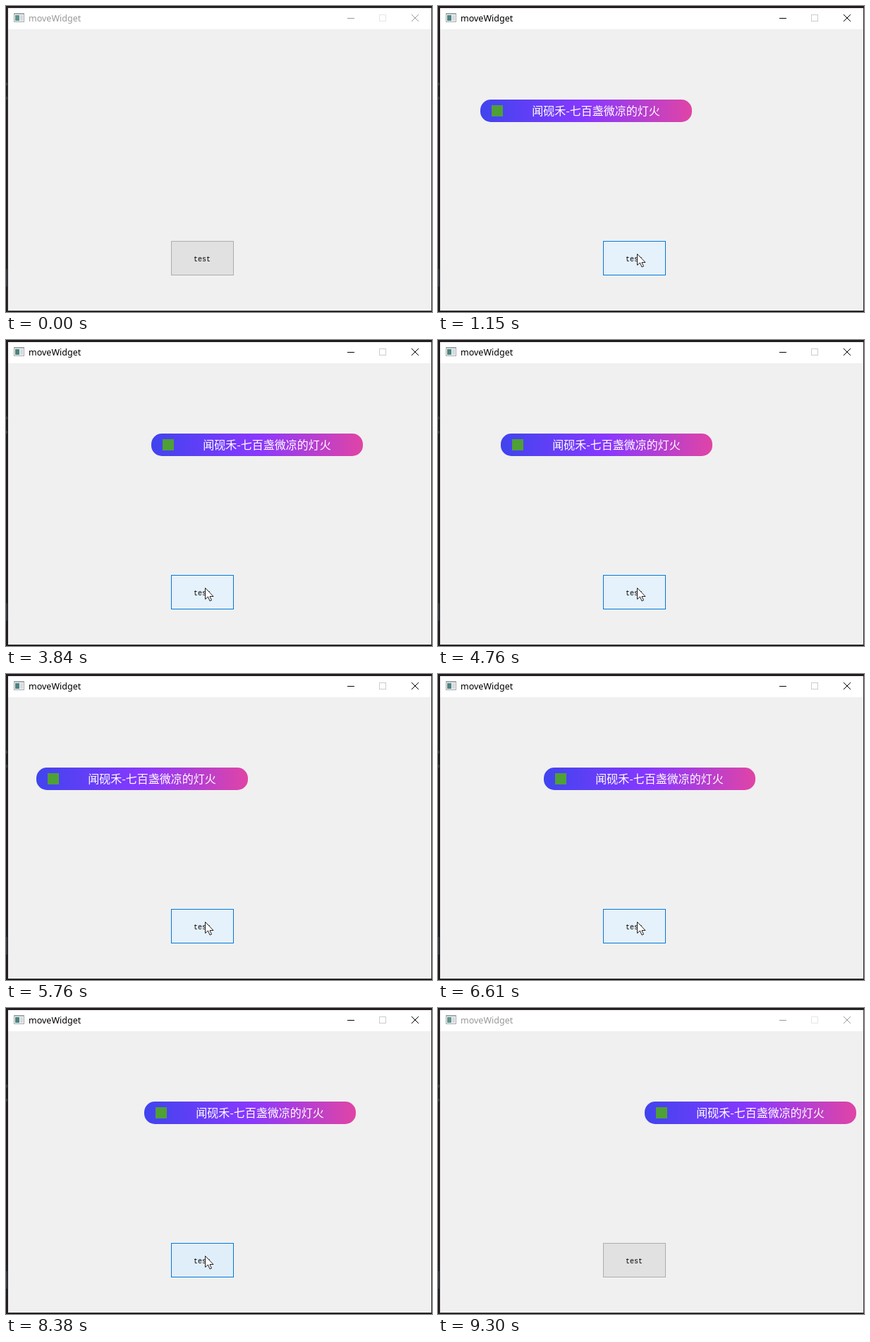
Animation of 604x435 px, one loop 9380 ms. Source, as an HTML page with a canvas:

```html
<!DOCTYPE html>
<html lang="zh">
<head>
<meta charset="utf-8">
<style>
  html, body { margin: 0; width: 604px; height: 435px; overflow: hidden; background: #1e1a1d; }
  canvas { display: block; }
</style>
</head>
<body>
<canvas id="stage" width="604" height="435"></canvas>
<script>
const ctx = document.getElementById('stage').getContext('2d');
const LOOP = 9380, STEP = 76.85;      // loop length and redraw interval, ms
const SPEED = 0.1265, TRAVEL = 300;   // pill speed in px/ms and its range
const CLICKS = [702, 6849];
const PRESS = 80;
const ACTIVE = [CLICKS[0] - PRESS, 9130];
const ENTER = [290, 560], LEAVE = [8790, 9050];

const clamp = v => Math.max(0, Math.min(1, v));
const ease = v => v * v * (3 - 2 * v);
const progress = (t, [from, to]) => ease(clamp((t - from) / (to - from)));

function rect(x, y, w, h, color) {
  ctx.fillStyle = color;
  ctx.fillRect(x, y, w, h);
}

function frame(x, y, w, h, color) {
  ctx.strokeStyle = color;
  ctx.lineWidth = 1;
  ctx.strokeRect(x + 0.5, y + 0.5, w - 1, h - 1);
}

function text(str, x, y, font, color, align = 'left') {
  ctx.font = font;
  ctx.fillStyle = color;
  ctx.textAlign = align;
  ctx.fillText(str, x, y);
}

function drawWindow(active) {
  rect(0, 0, 604, 435, '#1e1a1d');
  rect(0, 109, 2, 4, '#3a383c');
  rect(0, 129, 2, 4, '#3a383c');
  rect(0, 374, 2, 25, '#35323c');
  frame(2, 2, 602, 432, active ? '#2a272a' : '#3e3c3e');
  rect(3, 3, 600, 30, '#fff');
  rect(3, 33, 600, 400, '#f0f0f0');

  // application icon
  rect(11, 10, 15, 13, '#a3a9ae');
  rect(12, 12, 13, 10, '#f4f6f7');
  rect(13, 13, 6, 8, active ? '#4d8580' : '#5f958f');
  rect(20, 13, 4, 8, '#d5dadd');

  const ink = active ? '#000' : '#999';
  text('moveWidget', 32, 22, '12.5px "Noto Sans", sans-serif', ink);
  rect(484, 17, 10, 1, ink);
  frame(529, 12, 10, 10, active ? '#ccc' : '#e6e6e6');
  ctx.strokeStyle = ink;
  ctx.beginPath();
  ctx.moveTo(575, 12); ctx.lineTo(585, 22);
  ctx.moveTo(585, 12); ctx.lineTo(575, 22);
  ctx.stroke();
}

function drawButton(t, active, cursor) {
  const pressed = CLICKS.some(c => t >= c - PRESS && t < c);
  const hover = cursor && cursor.y < 383;
  let fill = '#e1e1e1', border = '#adadad';
  if (pressed) [fill, border] = ['#cce4f7', '#005499'];
  else if (hover) [fill, border] = [t < CLICKS[1] ? '#e5f1fb' : '#e0eefa', '#0078d7'];
  else if (active) border = '#0078d7';
  rect(234, 334, 89, 49, fill);
  frame(234, 334, 89, 49, border);
  text('test', 266, 363, '10px "Liberation Mono", monospace', '#000');
}

function drawPill(t) {
  const start = CLICKS.filter(c => c <= t).pop();
  if (start === undefined) return;
  const way = (t - start) * SPEED % (2 * TRAVEL);
  const x = Math.round(3 + (way < TRAVEL ? way : 2 * TRAVEL - way));
  const fill = ctx.createLinearGradient(x, 0, x + 300, 0);
  fill.addColorStop(0, '#4044ee');
  fill.addColorStop(0.5, '#8838ff');
  fill.addColorStop(1, '#e044a6');
  ctx.fillStyle = fill;
  ctx.beginPath();
  ctx.roundRect(x, 133, 300, 32, 15);
  ctx.fill();
  rect(x + 16, 141, 16, 16, '#4fa036');
  text('闻砚禾-七百盏微凉的灯火', x + 164, 154.5, '16px "Noto Sans CJK SC", "Noto Sans CJK", sans-serif', '#fff', 'center');
}

function cursorAt(t) {
  if (t < ENTER[0] || t > LEAVE[1]) return null;
  const away = 1 - progress(t, ENTER) + progress(t, LEAVE);
  return { x: 282 + 20 * away, y: 352 + 83 * away };
}

function drawCursor({ x, y }) {
  ctx.save();
  ctx.beginPath();
  ctx.rect(3, 3, 600, 432);
  ctx.clip();
  ctx.translate(Math.round(x) + 0.5, Math.round(y) + 0.5);
  ctx.beginPath();
  [[0, 0], [0, 16], [4, 12.5], [6.5, 18.5], [9, 17.5], [6.5, 12], [11.5, 12]]
    .forEach(p => ctx.lineTo(...p));
  ctx.closePath();
  ctx.fillStyle = '#fff';
  ctx.fill();
  ctx.strokeStyle = '#222';
  ctx.stroke();
  ctx.restore();
}

function draw(now) {
  const t = Math.floor((now % LOOP + 9) / STEP) * STEP;
  const active = t >= ACTIVE[0] && t < ACTIVE[1];
  const cursor = cursorAt(t);
  drawWindow(active);
  drawButton(t, active, cursor);
  drawPill(t);
  if (cursor) drawCursor(cursor);
}

const begin = performance.now();
function tick() {
  draw(performance.now() - begin);
  requestAnimationFrame(tick);
}
tick();
</script>
</body>
</html>
```
